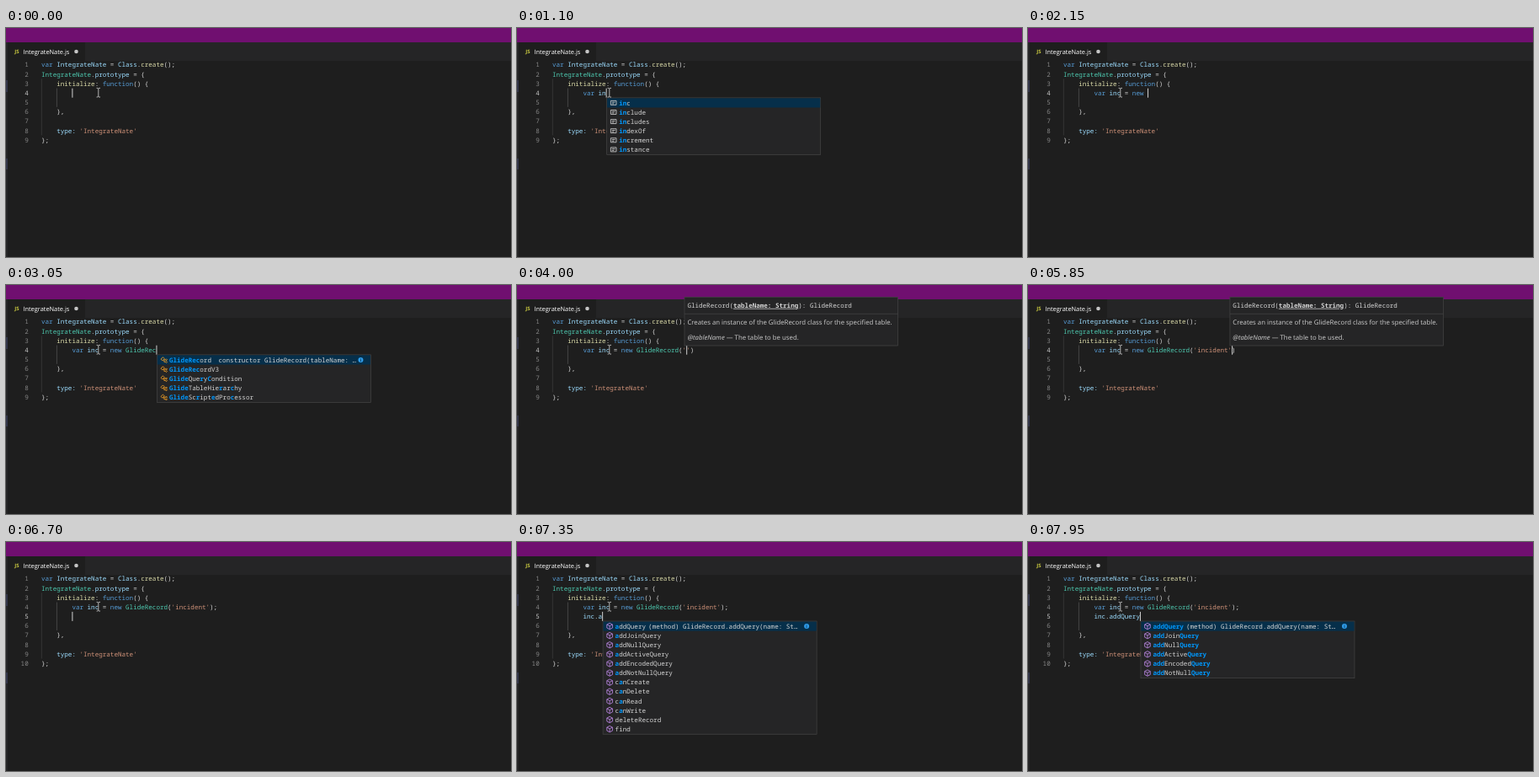
An HTML page that plays this animation: 600x272 px, repeating every 8000 ms.

```html
<!DOCTYPE html>
<html lang="en">
<head>
<meta charset="utf-8">
<title>Editor typing</title>
<style>
  html, body { margin: 0; width: 100%; height: 100%; overflow: hidden; background: #1e1e1e; }
  svg { display: block; width: 600px; height: 272px; }
  text { white-space: pre; text-rendering: geometricPrecision; fill: #d4d4d4; font: 7.58px "Noto Sans Mono", monospace; }
  .ui { font: 7.8px "Open Sans", sans-serif; fill: #cccccc; }
  .tab { font-size: 7.4px; fill: #ffffff; }
  .js { font: 700 6px "Open Sans", sans-serif; fill: #cbcb41; }
  .num { text-anchor: end; fill: #858585; }
  .num.on { fill: #c6c6c6; }
  .kw { fill: #569cd6; }
  .type { fill: #4ec9b0; }
  .fn { fill: #dcdcaa; }
  .str { fill: #ce9178; }
  .id { fill: #9cdcfe; }
  .hit { fill: #0097fb; font-weight: 700; }
  .param { font-weight: 700; text-decoration: underline; }
  .box { fill: #252526; stroke: #454545; stroke-width: .7; }
  .icon { fill: none; stroke-width: .9; }
  .info { font: 700 5px "Open Sans", sans-serif; fill: #062f4a; text-anchor: middle; }
</style>
</head>
<body>
<svg viewBox="0 0 600 272">
  <rect width="600" height="272" fill="#1e1e1e"/>
  <rect y="17" width="600" height="22" fill="#252526"/>
  <rect x="2" y="17" width="92" height="22" fill="#1e1e1e"/>
  <rect width="600" height="17" fill="#700f70"/>
  <rect y="17" width="2" height="255" fill="#252526"/>
  <path d="M0 62h2v14h-2zM0 155h2v13h-2z" fill="#33364a"/>
  <text class="js" x="10.3" y="30.2">JS</text>
  <text class="ui tab" x="20.4" y="30.8">IntegrateNate.js</text>
  <circle cx="83.5" cy="28" r="2.3" fill="#c5c5c5"/>
  <g id="code"></g>
  <g id="widget"></g>
  <path d="M107.6 71.4h1.4l.8.7.8-.7h1.4M109.8 72v9.4M107.6 82l1.4 0 .8-.7.8.7h1.4" fill="none" stroke="#d8d8d8" stroke-width=".8"/>
</svg>
<script>
const LOOP = 8000, CHAR = 4.548, LINE = 11.17, LEFT = 42, INDENT = 8;
const keys = "var inc = new GlideRecord('incident');\ninc.addQuery";
const keyTimes = [
  250, 400, 550, 800, 950, 1100, 1300, 1500, 1650, 1750,
  1850, 1950, 2000, 2100, 2300, 2400, 2480, 2550, 2650, 2800, 2900, 3000, 3200, 3350, 3500,
  3800, 4000, 4200, 4400, 4550, 4700, 4850, 4950, 5100, 5300, 5750, 5950, 6100, 6500,
  6900, 7000, 7100, 7200, 7300, 7400, 7500, 7600, 7700, 7800, 7850, 7900
];
const HINT_END = 6200;

const words = list => list.split(" ");
const pools = {
  v: words("var void valueOf values View VBArray ValidityState VideoTrack VRDisplay VTTCue visualViewport VideoTrackList"),
  i: words("inc include includes indexOf increment instance if import in interface instanceof isNaN"),
  n: words("new name null number never namespace navigator Node Number NaN NodeList Notification"),
  G: words("GlideRecord GlideRecordV3 GlideQueryCondition GlideTableHierarchy GlideScriptedProcessor GlideAggregate GlideDateTime GlideElement GlideSession GlideSystem GlideSchedule GlideUser"),
  method: words("addQuery addJoinQuery addNullQuery addActiveQuery addEncodedQuery addNotNullQuery canCreate canDelete canRead canWrite deleteRecord find")
};
const details = {
  GlideRecord: [73, "constructor GlideRecord(tableName: …"],
  addQuery: [54, "(method) GlideRecord.addQuery(name: St…"]
};

const code = document.getElementById("code");
const widget = document.getElementById("widget");
const baseline = row => 46.4 + row * LINE;
const span = (cls, s) => `<tspan class="${cls}">${s}</tspan>`;
const text = (x, y, body, cls = "") => `<text class="${cls}" x="${x}" y="${y}">${body}</text>`;

const tokens = /(?<str>'[^']*'?)|(?<kw>\b(?:var|new|function)\b)|(?<type>(?<=new )\w+|\w+(?=\.prototype))|(?<fn>\w+(?=\(|: function))|(?<id>\w+:?)/g;
function highlight(line) {
  return line.replace(tokens, (s, ...rest) => {
    const groups = rest.at(-1);
    return span(Object.keys(groups).find(k => groups[k] !== undefined), s);
  });
}

function closers(line) {
  const open = line.includes("(") && !line.includes(")") ? ")" : "";
  return (line.split("'").length % 2 ? "" : "'") + open;
}

function drawCode(typed, caretOn) {
  const pad = " ".repeat(INDENT);
  const lines = [
    "var IntegrateNate = Class.create();",
    "IntegrateNate.prototype = {",
    "    initialize: function() {",
    ...typed.map(s => pad + s + closers(s)),
    "", "    },", "", "    type: 'IntegrateNate'", "};"
  ];
  const active = 2 + typed.length;
  const caretX = LEFT + (INDENT + typed.at(-1).length) * CHAR;
  const guide = (x, from, to, color) =>
    `<path d="M${x} ${38 + from * LINE}V${38 + to * LINE}" stroke="${color}" stroke-width=".7"/>`;

  code.innerHTML =
    guide(42.3, 2, lines.length - 1, "#404040") +
    guide(60.4, 3, 4 + typed.length, "#585858") +
    lines.map((line, i) =>
      text(26.7, baseline(i), i + 1, i === active ? "num on" : "num") +
      text(LEFT, baseline(i), highlight(line))).join("") +
    (caretOn ? `<rect x="${caretX}" y="${38.2 + active * LINE}" width="1" height="11" fill="#d0d0d0"/>` : "");
  return { x: caretX, bottom: 38.2 + (active + 1) * LINE };
}

function emphasize(label, word) {
  let rest = word.toLowerCase();
  const lower = label.toLowerCase();
  return [...label].map((c, i) => {
    while (rest && !lower.includes(rest[0], i)) rest = rest.slice(1);
    if (!rest || lower[i] !== rest[0]) return c;
    rest = rest.slice(1);
    return span("hit", c);
  }).join("");
}

function suggestions(line, row) {
  if (line.includes("(")) return null;
  const [, dot, word] = line.match(/(\.?)(\w*)$/);
  if (!dot && !word) return null;
  const kind = dot ? "method" : word[0];
  let count = 12;
  if (kind === "G") count = word.length < 7 ? 12 : word.length < 9 ? 5 : 3;
  if (kind === "i" && row === 0) count = 6;
  if (dot && word.length > 3) count = 6;
  return { kind, word, labels: pools[kind].slice(0, count) };
}

function icon(kind, x, y) {
  const at = `class="icon" transform="translate(${x} ${y})"`;
  if (kind === "G")
    return `<g ${at} stroke="#ee9d28"><path d="M-3.4-.8L-1-3.2 .8-1.4-1.6 1zM0 0H2M.4 0V2.4H2"/><path d="M2-.1l1-1 1 1-1 1zM2 2.6l1-1 1 1-1 1z"/></g>`;
  if (kind === "method")
    return `<path ${at} stroke="#b180d7" d="M0-3.7L3.3-2V2L0 3.7-3.3 2V-2zM-3.3-2L0-.3 3.3-2M0-.3V3.7"/>`;
  return `<path ${at} stroke="#c5c5c5" d="M-3.3-2.5H3.3V2.5H-3.3zM-1.8-.7H1.8M-1.8 1H.6"/>`;
}

function drawPopup({ kind, word, labels }, caret) {
  const x = caret.x + 1, y = caret.bottom, pitch = 11.1;
  const rows = labels.map((label, i) => {
    const mid = y + 6 + i * pitch;
    return icon(kind, x + 8, mid) + text(x + 14.5, mid + 2.7, emphasize(label, word));
  });
  const [dx, detail] = details[labels[0]] || [];
  const extra = detail
    ? text(x + dx, y + 8.7, detail) +
      `<circle cx="${x + 242}" cy="${y + 6}" r="3" fill="#2f9be8"/>` + text(x + 242, y + 7.9, "i", "info")
    : "";
  return `<rect class="box" x="${x}" y="${y}" width="254" height="${labels.length * pitch + 1}"/>` +
    `<rect x="${x + .4}" y="${y + .5}" width="253.2" height="${pitch}" fill="#062f4a"/>` +
    rows.join("") + extra;
}

function drawHint(caret) {
  const x = caret.x - 2.2, tx = x + 3.4;
  return `<rect class="box" x="${x}" y="14.3" width="253.5" height="57.7"/>` +
    `<path d="M${x} 34.3h253.5" stroke="#454545" stroke-width=".7"/>` +
    text(tx, 26.8, `GlideRecord(${span("param", "tableName: String")}): GlideRecord`) +
    text(tx, 46.9, "Creates an instance of the GlideRecord class for the specified table.", "ui") +
    text(tx, 64.6, '<tspan font-style="italic">@tableName</tspan> — The table to be used.', "ui");
}

let shown = "";
function frame() {
  const t = performance.now() % LOOP;
  const count = keyTimes.filter(k => k <= t).length;
  const lastKey = count ? keyTimes[count - 1] : 0;
  const caretOn = (t - lastKey) % 1000 < 500;
  const typed = keys.slice(0, count).split("\n");
  const line = typed.at(-1);
  const hint = line.includes("(") && t < HINT_END;
  const state = [count, caretOn, hint].join();
  if (state !== shown) {
    shown = state;
    const caret = drawCode(typed, caretOn);
    const list = suggestions(line, typed.length - 1);
    widget.innerHTML = hint ? drawHint(caret) : list ? drawPopup(list, caret) : "";
  }
  requestAnimationFrame(frame);
}
frame();
</script>
</body>
</html>
```
